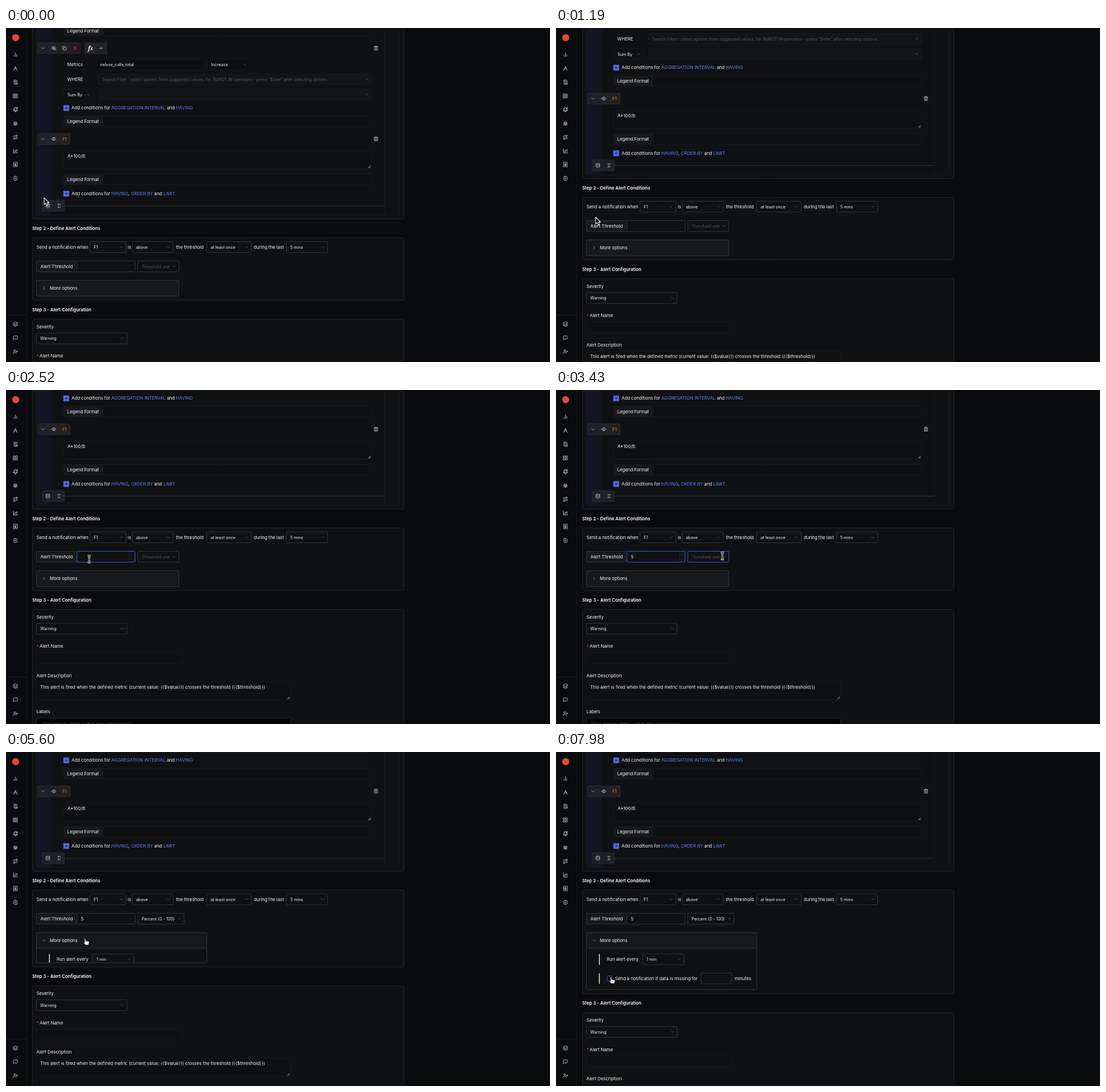
Animation of 955x587 px, one loop 8000 ms. Source, as an HTML page with a canvas:

```html
<!DOCTYPE html>
<html lang="en">
<head>
<meta charset="utf-8">
<title>Alert form</title>
<style>
html, body { margin: 0; width: 100%; height: 100%; overflow: hidden; background: #0a0b0e; }
canvas { display: block; }
</style>
</head>
<body>
<canvas id="stage" width="955" height="587"></canvas>
<script>
const ctx = document.getElementById('stage').getContext('2d');
const LOOP = 8000, STEP = 70;
const PAGE = '#0a0b0e', PANEL = '#101113', FIELD = '#0f1012', RAISED = '#18191c';
const FAINT = '#18191b', EDGE = '#232427', LINE = '#323336';
const WHITE = '#f6f6f6', GRAY = '#55565a', ICON = '#c2c3c7', LINK = '#5c80ff', FOCUS = '#2f55cc';

const RING = 'M12 15a3 3 0 1 0 0-6 3 3 0 0 0 0 6';
const EYE = 'M2 12s3-7 10-7 10 7 10 7-3 7-10 7-10-7-10-7z' + RING;
const icons = {
  bars: 'M6 20v-6M12 20V4M18 20V10',
  compass: 'M12 7a2 2 0 1 0 0-4 2 2 0 0 0 0 4M11 7 4 21M13 7l7 14M6 13q6 5 13-1',
  scroll: 'M19 17V5a2 2 0 0 0-2-2H4a2 2 0 0 1 2 2v14a2 2 0 0 0 2 2h12a2 2 0 0 0 2-2v-1H10v1a2 2 0 0 1-2 2M10 8h5M10 12h5',
  grid: 'M3 3h7v7H3zM14 3h7v7h-7zM14 14h7v7h-7zM3 14h7v7H3z',
  bell: 'M6 8a6 6 0 0 1 12 0c0 7 3 9 3 9H3s3-2 3-9M10 21h4M21 2v6',
  bug: 'M8 10a4 4 0 0 1 8 0v6a4 4 0 0 1-8 0zM12 11v9M8 5l1 2M16 5l-1 2M3 13h5M16 13h5M4 7l4 3M20 7l-4 3M4 20l4-3M20 20l-4-3',
  route: 'M6 22a3 3 0 1 0 0-6 3 3 0 0 0 0 6M9 19h8.5a3.5 3.5 0 0 0 0-7h-11a3.5 3.5 0 0 1 0-7H15M18 8a3 3 0 1 0 0-6 3 3 0 0 0 0 6',
  chart: 'M3 3v18h18M7 17v-5M12 17V8l3 3 4-5v11',
  receipt: 'M4 2v20l2-1 2 1 2-1 2 1 2-1 2 1 2-1 2 1V2zM15 8h-5a2 2 0 0 0 0 4h4a2 2 0 0 1 0 4H8M12 6v12',
  gear: RING + 'M10 2h4l1 3 3-1 3 4-2 3v2l2 3-3 4-3-1-1 3h-4l-1-3-3 1-3-4 2-3v-2L3 8l3-4 3 1z',
  layers: 'M12 2 2 7l10 5 10-5zM2 12l10 5 10-5M2 17l10 5 10-5',
  message: 'M21 15a2 2 0 0 1-2 2H7l-4 4V5a2 2 0 0 1 2-2h14a2 2 0 0 1 2 2z',
  invite: 'M16 21v-2a4 4 0 0 0-4-4H6a4 4 0 0 0-4 4v2M9 11a4 4 0 1 0 0-8 4 4 0 0 0 0 8M19 8v6M22 11h-6',
  down: 'M4 8l8 8 8-8',
  right: 'M8 4l8 8-8 8',
  eye: EYE,
  hidden: EYE + 'M3 3l18 18',
  copy: 'M9 9h12v12H9zM5 15H3V3h12v2',
  plus: 'M4 12h16M12 4v16',
  trash: 'M3 6h18M19 6v15H5V6M8 6V2h8v4M10 11v6M14 11v6',
  store: 'M3 5a9 3 0 0 0 18 0 9 3 0 0 0-18 0v14a9 3 0 0 0 18 0V5M3 12a9 3 0 0 0 18 0',
  sigma: 'M18 7V4H6l6 8-6 8h12v-3',
};
for (const name in icons) icons[name] = new Path2D(icons[name]);

const pointers = {
  arrow: new Path2D('M0 0V11.8L2.8 9.4 4.8 13.8 6.9 12.9 5 8.6H8.8z'),
  hand: new Path2D('M-1 .6q1-1.2 2 0V4.2L6.2 5.2q1.2.4.9 2L6 11.6H.6L-2.6 7.8q-.4-1.4 1.6-.4z'),
  beam: new Path2D('M-2.6-6Q-.4-6 0-5 .4-6 2.6-6M0-5V5M-2.6 6Q-.4 6 0 5 .4 6 2.6 6M-1.3 1h2.6'),
};
// Pointer hot spot: time, x, y
const pointerPath = [
  [70, 67, 298.5], [840, 69.5, 332.5], [1190, 69.5, 332.5], [1400, 81.5, 321], [1750, 146, 297],
  [2940, 146, 297], [3430, 292, 291.5], [3780, 286, 296], [4270, 275, 330], [4480, 262, 333],
  [5040, 166.5, 333.5], [5250, 138, 326], [5530, 138, 326], [6230, 172, 383], [6580, 134.5, 389],
  [7070, 97, 391], [7210, 96.5, 395.5],
];
const scrollPath = [[910, 0], [980, 8], [1190, 71], [1400, 126]];

function at(path, t, col = 1, ease = x => x) {
  const i = path.findIndex(p => p[0] > t);
  if (i === 0) return path[0][col];
  if (i < 0) return path[path.length - 1][col];
  const a = path[i - 1], b = path[i];
  return a[col] + (b[col] - a[col]) * ease((t - a[0]) / (b[0] - a[0]));
}
const smooth = x => x * x * (3 - 2 * x);
const between = (t, a, b) => t >= a && t < b;

function text(s, x, y, color = WHITE, size = 7.8, weight = 400) {
  ctx.font = `${weight} ${size}px Inter, sans-serif`;
  ctx.fillStyle = color;
  ctx.fillText(s, x, y + size * .36);
  return x + ctx.measureText(s).width;
}
const small = (s, x, y, color) => text(s, x, y, color, 7.25);
const heading = (s, y) => text(s, 46, y, '#fff', 7.8, 600);

function fill(x1, y1, x2, y2, color) {
  ctx.fillStyle = color;
  ctx.fillRect(x1, y1, x2 - x1, y2 - y1);
}
function box(x1, y1, x2, y2, bg, edge, r = 1) {
  ctx.beginPath();
  ctx.roundRect(x1 + .5, y1 + .5, x2 - x1 - 1, y2 - y1 - 1, r);
  if (bg) { ctx.fillStyle = bg; ctx.fill(); }
  if (edge) { ctx.strokeStyle = edge; ctx.lineWidth = 1; ctx.stroke(); }
}
function icon(name, x, y, size = 9, color = ICON, weight = 2.2) {
  ctx.save();
  ctx.translate(x - size / 2, y - size / 2);
  ctx.scale(size / 24, size / 24);
  ctx.strokeStyle = color;
  ctx.lineWidth = weight;
  ctx.lineCap = ctx.lineJoin = 'round';
  ctx.stroke(icons[name]);
  ctx.restore();
}
function select(label, x1, x2, y, edge = LINE, color = WHITE, bg = PANEL) {
  box(x1, y - 10, x2, y + 10, bg, edge);
  small(label, x1 + 7, y, color);
  icon('down', x2 - 9, y, 6.5, '#66676b', 2.4);
}
function area(x1, y1, x2, y2, ...parts) {
  box(x1, y1, x2, y2, FIELD, FAINT);
  parts.reduce((x, s) => text(s, x, y1 + 9.5), x1 + 7);
  ctx.beginPath();
  ctx.moveTo(x2 - 6, y2 - 2); ctx.lineTo(x2 - 2, y2 - 6);
  ctx.moveTo(x2 - 3.5, y2 - 2); ctx.lineTo(x2 - 2, y2 - 3.5);
  ctx.strokeStyle = '#ddd'; ctx.lineWidth = .8; ctx.stroke();
}
function legend(y) {
  box(101, y - 10, 642, y + 10, FIELD, FAINT);
  fill(101, y - 9.5, 171, y + 9.5, RAISED);
  text('Legend Format', 107.5, y);
}
// Parts alternate between links and plain words
function conditions(y, ...parts) {
  fill(100.7, y - 4.8, 110.7, y + 5.2, '#4a70f2');
  icon('plus', 105.7, y + .2, 7, '#0e1330', 2.6);
  let x = text('Add conditions for ', 115, y);
  parts.forEach((s, i) => x = text(s, x, y, i % 2 ? WHITE : LINK));
}
function buttons(x1, x2, y) {
  box(x1, y - 10, x2, y + 10, '#1f2127', '#292b32');
}

function queryPanel(scroll) {
  box(46, -200, 699, 336, PANEL, EDGE, 3);
  box(53, -200, 691, 329, null, FAINT);
  fill(54, -200, 80, 328, '#141522');
  fill(664, -200, 665, 328, FAINT);
  legend(5);

  buttons(55, 131, 35.5);
  box(112, 26, 131, 45, '#2a181b');
  icon('down', 65, 35.5, 8);
  icon('hidden', 84, 35.5);
  icon('copy', 102.5, 35.5);
  small('B', 119, 35.5, '#c4544f');
  buttons(138, 177, 35.5);
  fill(139, 27, 158, 45, '#25272e');
  ctx.font = 'italic 600 10px "Noto Serif", serif';
  ctx.fillStyle = '#fff';
  ctx.fillText('f', 144, 38.5);
  text('x', 148, 36.5, '#fff', 8, 600);
  icon('plus', 167, 35.5, 8);
  icon('trash', 649.5, 35.5, 9);

  text('Metrics', 107.5, 64.5);
  box(158, 55, 347, 74, '#0d0e10', FAINT);
  small('nelvox_calls_total', 165, 64.5);
  select('Increase', 353, 428, 64.5, FAINT, WHITE, '#0d0e10');
  text('WHERE', 107.5, 90.5);
  select('Search Filter : select options from suggested values, for IN/NOT IN operators - press "Enter" after selecting options',
    162, 642, 90, FAINT, GRAY, '#141518');
  select('Sum By', 101, 154, 117, FAINT);
  select('', 162, 642, 117, FAINT, GRAY, '#141518');
  conditions(140.5, 'AGGREGATION INTERVAL', ' and ', 'HAVING');
  legend(164);

  buttons(55, 113, 195);
  fill(93, 186, 112, 204, '#25211f');
  icon('down', 65, 195, 8);
  icon('eye', 84, 195);
  small('F1', 99, 195, '#d9905a');
  icon('trash', 649.5, 195, 9);
  area(101, 216, 642, 248, 'A*', '100/B');
  legend(266);
  conditions(291, 'HAVING', ', ', 'ORDER BY', ' and ', 'LIMIT');
  fill(103, 312, 664, 313.3, scroll > 120 ? '#1d2d3b' : '#2d2e31');
  buttons(63, 103, 312.5);
  icon('store', 73.5, 312.5, 8.5);
  icon('sigma', 93, 312.5, 8.5);
}

function thresholdRow(t) {
  const picked = t >= 4480, right = picked ? 313 : 304;
  const active = between(t, 1750, 3570), open = between(t, 3570, 4480);
  box(53, 409, 125, 429, RAISED, LINE);
  text('Alert Threshold', 60.5, 419);
  box(124, 409, 227, 429, PANEL, active ? FOCUS : LINE);
  if (t >= 2940) text('5', 131.5, 419);
  if (between(t, 1960, 2520)) fill(132, 414, 132.7, 424, WHITE);
  if (between(t, 1820, 3570)) {
    box(216, 410, 226, 428, null, EDGE);
    icon('down', 221, 423, 4, GRAY);
    ctx.save();
    ctx.translate(221, 415);
    ctx.scale(1, -1);
    icon('down', 0, 0, 4, GRAY);
    ctx.restore();
  }
  const typed = 'perc'.slice(0, Math.max(0, Math.ceil((t - 3710) / 140)));
  const label = picked ? 'Percent (0 - 100)' : open && typed || 'Threshold unit';
  select(label, 231, right, 419, between(t, 3400, 5460) ? FOCUS : LINE, picked || open && typed ? WHITE : GRAY);
  if (between(t, 4480, 5460)) fill(238, 414, 238.8, 424, WHITE);
  return right;
}

function moreOptions(right, grow) {
  if (grow > 0) right = 353;
  const bottom = 471.5 + grow;
  box(53, 443, right, bottom, PANEL, LINE);
  box(53, 443, right, 471.5, RAISED, LINE);
  icon(grow > 0 ? 'down' : 'right', 67, 457, 7);
  text('More options', 77, 457);
}

function moreBody(t, grow) {
  ctx.save();
  ctx.beginPath();
  ctx.rect(54, 472, 298, Math.max(0, grow - 1.5));
  ctx.clip();
  fill(75.5, 481, 77, 500, '#e4e4e4');
  text('Run alert every', 89, 490.5);
  select('1 min', 152, 225, 490.5);
  fill(75.5, 515, 77, 533.5, '#e4e4e4');
  box(89, 519, 99, 529, PANEL, t >= 7140 ? FOCUS : LINE);
  text('Send a notification if data is missing for', 103.5, 524);
  box(254, 514, 309, 534, PANEL, LINE);
  text('minutes', 313.5, 524);
  ctx.restore();
}

function conditionPanel(t, grow) {
  heading('Step 2 - Define Alert Conditions', 352);
  box(46, 368, 699, 479 + grow, PANEL, EDGE, 3);
  text('Send a notification when', 53.5, 385);
  select('F1', 147, 211, 385);
  text('is', 213.5, 385);
  select('above', 221, 294, 385);
  text('the threshold', 298.5, 385);
  select('at least once', 352, 431, 385);
  text('during the last', 435, 385);
  select('5 mins', 492, 565, 385);
  const right = thresholdRow(t);
  moreOptions(right, grow);
  if (grow > 0) moreBody(t, grow);
  if (between(t, 3570, 4480)) {
    box(231, 431, 304, 471, '#1f2023', null, 2);
    fill(233, 442, 302, 461, '#292a2e');
    small('Percent (0 - 100)', 238, 451.5);
  }
}

function configPanel() {
  heading('Step 3 - Alert Configuration', 495);
  box(46, 511, 699, 1000, PANEL, EDGE, 3);
  text('Severity', 53.5, 525);
  select('Warning', 53, 213, 545.5);
  text('*', 53.5, 577, '#d5403f');
  text('Alert Name', 59, 576.5);
  box(53, 587, 309, 607, FIELD, FAINT);
  text('Alert Description', 53.5, 628);
  area(53, 638.5, 500, 671, 'This alert is fired when the defined metric (current value: {{$value}}) crosses the threshold ({{$threshold}})');
  text('Labels', 53.5, 691);
  box(53, 702, 500, 724, '#040405', EDGE);
  text('Click here to enter a label (key:value pairs)', 62, 713, GRAY);
}

function sidebar() {
  fill(0, 0, 36, 587, PAGE);
  fill(36, 0, 37, 587, '#17181c');
  ctx.beginPath();
  ctx.arc(17, 17, 6.2, 0, 7);
  ctx.fillStyle = '#e5482f';
  ctx.fill();
  ['bars', 'compass', 'scroll', 'grid', 'bell', 'bug', 'route', 'chart', 'receipt', 'gear']
    .forEach((name, i) => icon(name, 16.5, 47 + i * 24.15, 9.5, name === 'bell' ? '#fff' : ICON));
  fill(0, 504, 36, 505, '#1c1d21');
  ['layers', 'message', 'invite'].forEach((name, i) => icon(name, 16.5, 520.5 + i * 24.15, 9.5));
}

function pointer(t) {
  if (between(t, 2800, 2940)) return;
  const kind = between(t, 1820, 4270) ? 'beam'
    : between(t, 1330, 1680) || between(t, 4270, 5880) || t >= 7140 ? 'hand' : 'arrow';
  const shape = pointers[kind];
  ctx.save();
  ctx.translate(at(pointerPath, t, 1, smooth), at(pointerPath, t, 2, smooth));
  ctx.lineJoin = 'round';
  if (kind === 'beam') {
    ctx.lineWidth = 3; ctx.strokeStyle = '#eee'; ctx.stroke(shape);
    ctx.lineWidth = 1.1; ctx.strokeStyle = '#111'; ctx.stroke(shape);
  } else {
    const dark = kind === 'arrow';
    ctx.fillStyle = dark ? '#050505' : '#f4f4f4';
    ctx.strokeStyle = dark ? '#f4f4f4' : '#111';
    ctx.lineWidth = dark ? 1.1 : .8;
    ctx.fill(shape);
    ctx.stroke(shape);
  }
  ctx.restore();
}

function draw(t) {
  const scroll = at(scrollPath, t);
  const grow = 72.5 * smooth(Math.min(1, Math.max(0, (t - 5460) / 350)));
  fill(0, 0, 955, 587, PAGE);
  ctx.save();
  ctx.translate(0, -scroll);
  queryPanel(scroll);
  ctx.save();
  ctx.translate(0, grow);
  configPanel();
  ctx.restore();
  conditionPanel(t, grow);
  ctx.restore();
  sidebar();
  pointer(t);
}

const start = performance.now();
function tick() {
  const t = (performance.now() - start) % LOOP;
  draw(Math.floor(t / STEP) * STEP);
  requestAnimationFrame(tick);
}
tick();
</script>
</body>
</html>
```
